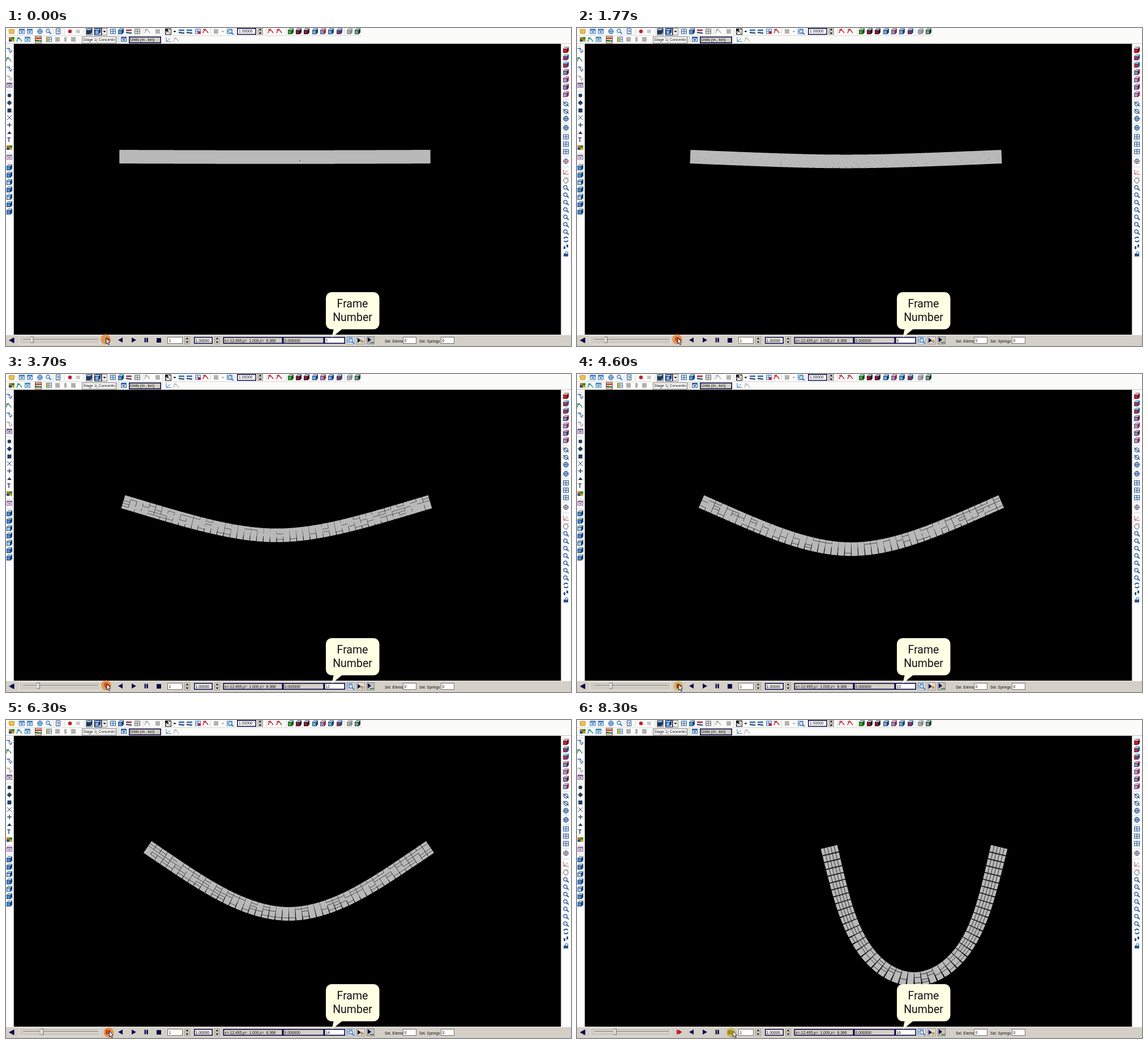
Animation, 998 px wide and 561 px high, one loop 8360 ms. Source, as an HTML page with a canvas:

```html
<!DOCTYPE html>
<html lang="en">
<head>
<meta charset="utf-8">
<title>Beam collapse</title>
<style>
html, body { margin: 0; width: 100%; height: 100%; overflow: hidden; background: #000; }
canvas { display: block; }
</style>
</head>
<body>
<canvas id="stage" width="998" height="561"></canvas>
<script>
const stage = document.getElementById('stage');
const LOOP = 8360, COLS = 48, ROWS = 5;
const NAVY = '#0a0a4a', FACE = '#d4d0c8', BLUE = '#3f78bd', RED = '#c02030', GRAY = '#a9a9a9';
const UI_FONT = '6.8px "Liberation Sans", Arial, sans-serif';
let g = stage.getContext('2d');

// ---------- drawing helpers ----------
function rect(x, y, w, h, c) { g.fillStyle = c; g.fillRect(x, y, w, h); }
function frame(x, y, w, h, fill, edge, lw = 1) {
  rect(x, y, w, h, fill);
  g.strokeStyle = edge; g.lineWidth = lw;
  g.strokeRect(x + lw / 2, y + lw / 2, w - lw, h - lw);
}
function path(pts, fill, stroke, lw = 1, closed = true) {
  g.beginPath();
  pts.forEach(([x, y], i) => i ? g.lineTo(x, y) : g.moveTo(x, y));
  if (closed) g.closePath();
  if (fill) { g.fillStyle = fill; g.fill(); }
  if (stroke) { g.strokeStyle = stroke; g.lineWidth = lw; g.stroke(); }
}
function line(x1, y1, x2, y2, c, lw = 1) { path([[x1, y1], [x2, y2]], null, c, lw, false); }
function disc(x, y, r, fill, stroke, lw = 1) {
  g.beginPath(); g.arc(x, y, r, 0, 7);
  if (fill) { g.fillStyle = fill; g.fill(); }
  if (stroke) { g.strokeStyle = stroke; g.lineWidth = lw; g.stroke(); }
}
function text(s, x, y, font = UI_FONT, c = '#111', align = 'left') {
  g.font = font; g.fillStyle = c; g.textAlign = align; g.fillText(s, x, y);
}
function tri(x, y, dir, c, w = 4) { path([[x - dir * w, y - 4.5], [x - dir * w, y + 4.5], [x + dir * w, y]], c); }

// ---------- toolbar icons ----------
const icons = {
  cube(x, y, c, d = '#16406f') {
    path([[x - 5, y - 2], [x - 2, y - 5], [x + 5, y - 5], [x + 2, y - 2]], '#b9d3ee', d, .7);
    path([[x + 2, y - 2], [x + 5, y - 5], [x + 5, y + 2], [x + 2, y + 5]], d);
    frame(x - 5, y - 2, 7, 7, c, d, .8);
  },
  grid(x, y, c) {
    frame(x - 5, y - 4.5, 10, 9, '#e4edf7', c);
    line(x, y - 4, x, y + 4, c); line(x - 5, y, x + 5, y, c);
  },
  win(x, y, c) { frame(x - 5, y - 4.5, 10, 9, '#dbe8f6', c); rect(x - 5, y - 4, 10, 2.5, c); rect(x - 2, y, 4, 2, c); },
  block(x, y, c) { rect(x - 4, y - 4, 8, 8, c); },
  disc(x, y, c) { disc(x, y, 3.3, c); },
  globe(x, y, c) {
    disc(x, y, 4.5, '#b5d0ef', c);
    line(x - 4, y, x + 4, y, c); g.beginPath(); g.ellipse(x, y, 2, 4.5, 0, 0, 7); g.stroke();
  },
  lens(x, y, c) { disc(x - 1, y - 1, 3.2, '#d9e8f8', c, 1.2); line(x + 1, y + 1, x + 5, y + 4.5, c, 1.8); },
  curve(x, y, c) {
    g.beginPath(); g.moveTo(x - 5, y + 3); g.quadraticCurveTo(x - 2, y - 8, x + 4, y + 3);
    g.strokeStyle = c; g.lineWidth = 1.5; g.stroke(); line(x - 5, y - 3, x, y - 4, c, 1.3);
  },
  arrow(x, y, c) {
    line(x - 5, y - 3, x + 1, y - 3, c, 1.4);
    path([[x - 1, y - 3], [x + 5, y + 2], [x + 2, y + 2], [x + 3, y + 5], [x, y + 3]], '#fff', c);
  },
  caret(x, y, c) { path([[x - 2.5, y - 1], [x + 2.5, y - 1], [x, y + 2]], c); },
  pause(x, y, c) { rect(x - 2.5, y - 3, 2, 6, c); rect(x + .8, y - 3, 2, 6, c); },
  bar(x, y, c) { rect(x - 2, y - 4, 4, 8, c); },
  folder(x, y, c) { path([[x - 5, y - 3], [x, y - 4], [x + 5, y - 3], [x + 4, y + 4], [x - 4, y + 4]], c, '#a67c16', .7); },
  flag(x, y, c) { line(x - 5, y - 2, x + 5, y - 2, c, 3); line(x - 5, y + 2, x + 5, y + 3, '#14365e', 2); },
  diamond(x, y, c) { path([[x, y - 4.5], [x + 4.5, y], [x, y + 4.5], [x - 4.5, y]], c); },
  cross(x, y, c) { line(x - 4, y - 4, x + 4, y + 4, c); line(x - 4, y + 4, x + 4, y - 4, c); },
  plus(x, y, c) { line(x - 4, y, x + 4, y, c, 1.4); line(x, y - 4, x, y + 4, c, 1.4); },
  up(x, y, c) { path([[x - 4, y + 3], [x + 4, y + 3], [x, y - 2]], c); },
  letter(x, y, c) { text('T', x, y + 3.5, 'bold 10px "Liberation Sans", sans-serif', c, 'center'); },
  help(x, y, c) { frame(x - 4, y - 5, 8, 10, '#fff', c); text('?', x, y + 3.5, 'bold 9px "Liberation Sans", sans-serif', c, 'center'); },
  color(x, y) {
    rect(x - 5, y - 4, 5, 4, '#d07018'); rect(x, y - 4, 5, 4, '#2a8a30');
    rect(x - 5, y, 5, 4, '#1b4f98'); rect(x, y, 5, 4, '#c8a818');
  },
  swirl(x, y, c) { disc(x, y, 3.6, null, c, 1.4); line(x - 5, y - 4, x + 5, y + 4, c, 1.4); },
  target(x, y, c) { disc(x, y, 4, '#f2dfe3', c); line(x - 5, y, x + 5, y, RED); line(x, y - 5, x, y + 5, c); },
  axes(x, y, c) { line(x - 4, y - 4, x - 4, y + 4, c); line(x - 4, y + 4, x + 5, y + 4, c); line(x - 4, y + 4, x + 3, y - 2, c); },
  hand(x, y, c) { path([[x - 5, y], [x - 2, y - 4], [x + 3, y - 4], [x + 4, y + 1], [x + 1, y + 5], [x - 2, y + 4]], '#fff', c); },
  cycle(x, y, c) {
    g.strokeStyle = c; g.lineWidth = 2;
    g.beginPath(); g.arc(x, y, 4, .4, 2.5); g.stroke(); g.beginPath(); g.arc(x, y, 4, 3.5, 5.7); g.stroke();
  },
  feet(x, y, c) { rect(x - 4, y - 1, 3, 5, c); rect(x + 1, y - 4, 3, 5, c); },
  lock(x, y, c) { rect(x - 4, y - 1, 8, 5, c); disc(x + 1, y - 2, 2.5, null, c); }
};
function icon(name, c, y, ...xs) { xs.forEach(x => icons[name](x, y, c)); }
function column(name, c, x, ...ys) { ys.forEach(y => icons[name](x, y, c)); }

function spinner(x, y, h) {
  frame(x - 5, y - h / 2, 10, h, FACE, '#8d8a84', .7);
  line(x - 5, y, x + 5, y, '#8d8a84', .7);
  path([[x - 2.5, y - 2], [x + 2.5, y - 2], [x, y - 5]], '#111');
  path([[x - 2.5, y + 2], [x + 2.5, y + 2], [x, y + 5]], '#111');
}

function drawTop() {
  rect(0, 0, 998, 28, '#fbfbfa');
  line(0, 13.5, 628, 13.5, '#d9d7d2'); line(0, 27.5, 998, 27.5, '#c9c7c2');
  icon('folder', '#f0c04c', 6, 10);
  icon('win', BLUE, 6, 28, 42);
  icon('globe', BLUE, 6, 60);
  icon('lens', BLUE, 6, 75);
  icon('help', '#24508f', 6, 92);
  icon('disc', RED, 6, 113);
  icon('pause', GRAY, 6, 127);
  frame(141, 0, 12, 13, '#cfcac2', '#888'); icon('cube', '#22334d', 6, 147);
  frame(156, 0, 13, 13, '#eef4fb', NAVY); icon('cube', '#86b5e6', 6, 162);
  frame(169, 0, 10, 13, '#f2f0ec', '#888');
  icon('caret', '#111', 6, 174, 298); icon('caret', GRAY, 6, 383);
  icon('grid', '#2b5d9c', 6, 189); icon('cube', '#5f9bdb', 6, 203);
  icon('flag', '#a04058', 6, 217);
  icon('grid', '#666', 6, 232);
  icon('curve', GRAY, 6, 250);
  icon('block', '#b5b3af', 6, 268, 371);
  frame(281, 1, 11, 11, '#fff', '#111'); icon('cross', '#333', 6, 286); rect(282, 2, 4, 4, '#222');
  icon('flag', BLUE, 6, 310, 324);
  icon('grid', BLUE, 6, 339); rect(339, 6, 5, 4, RED);
  icon('curve', RED, 6, 353);
  icon('grid', '#4682b4', 6, 395); icon('lens', BLUE, 7, 397);
  frame(408, 0, 34, 12, '#fff', NAVY, 1.5); text('1.00000', 411, 8);
  spinner(449, 6, 12);
  icon('curve', RED, 6, 468, 483);
  icons.cube(503, 6, '#43a037', '#155018');
  [517, 531].forEach(x => icons.cube(x, 6, '#8e1a32', '#251525'));
  icon('cube', '#78a8dd', 6, 546, 574);
  icons.cube(560, 6, '#6ba2dc', '#a02035'); icons.cube(589, 6, '#a52840', '#245084');
  icons.cube(607, 6, '#aaa', '#888'); icons.cube(621, 6, '#7ca18a', '#17372a');
  [21, 83, 103, 138, 182, 242, 277, 361, 403, 460, 495, 598].forEach(x => line(x, 1, x, 12, '#d5d3ce'));

  icon('color', '', 20, 10);
  icon('curve', '#248888', 21, 24); icon('win', '#3d86b5', 20, 38);
  frame(51, 14, 12, 13, '#f4efe2', '#7a5540'); icon('flag', '#c04028', 20, 57); rect(53, 22, 8, 2, '#28803a');
  icon('grid', BLUE, 20, 76); rect(72, 16, 4, 8, '#d4b438');
  icon('block', '#b2b0ac', 20, 91, 119); icon('bar', '#b2b0ac', 20, 105);
  frame(134, 15, 61, 12, '#fff', '#777');
  g.save(); g.beginPath(); g.rect(135, 15, 58, 12); g.clip();
  text('Stage 1( Concentrated', 136, 23); g.restore();
  rect(195, 14, 6, 13, '#e6e3dc');
  icon('win', '#2b5d9c', 20, 208);
  frame(217, 15, 57, 12, FACE, NAVY, 1.6); text('Units (m , ton)', 219.5, 23);
  icon('axes', BLUE, 20, 287); icon('curve', '#bbb', 21, 301);
}

function drawSides() {
  rect(0, 28, 14, 513, '#fdfdfd'); rect(12.5, 28, 1.5, 513, '#d4d2cd');
  rect(980, 28, 18, 513, '#fdfdfd'); rect(980, 28, 1.5, 513, '#d4d2cd');
  [32, 111, 221, 238].forEach(y => line(1, y, 11, y, '#c6c4bf', .8));
  [32, 126, 168, 184, 226, 245, 263].forEach(y => line(983, y, 995, y, '#c6c4bf', .8));
  column('arrow', '#2d5f9e', 6, 39, 72); column('curve', '#3a8668', 5, 56);
  column('arrow', '#999', 6, 88); column('win', '#79577f', 6, 101);
  const k = '#1d3f69';
  column('disc', k, 6, 119); column('diamond', k, 6, 132);
  rect(2.5, 142, 7, 7, k);
  column('cross', k, 6, 158); column('plus', k, 6, 171); column('up', k, 6, 184); column('letter', k, 5, 197);
  column('color', '', 6, 211); column('win', '#9a6d9e', 6, 228);
  column('cube', '#4d8bd0', 6, 246, 259, 285, 311, 324); column('cube', '#a8cdf2', 6, 272, 298);
  icons.cube(989, 39, '#c52324', '#701218');
  [52, 65].forEach(y => icons.cube(989, y, '#c52b35', '#274f84'));
  [78, 104].forEach(y => icons.cube(989, y, '#5d9bdd', '#7a1e35'));
  [91, 117].forEach(y => icons.cube(989, y, '#74aee8', '#a52538'));
  const b = '#28558f';
  column('swirl', b, 989, 134, 147); column('globe', b, 989, 160, 176);
  column('grid', b, 989, 192, 205, 218); column('target', b, 989, 235);
  column('axes', '#b04848', 989, 254); column('hand', '#555', 989, 269);
  column('lens', b, 989, 282, 295, 308, 321, 334, 347, 360);
  column('cycle', b, 989, 373); column('feet', b, 989, 386); column('lock', b, 989, 399);
}

function field(x, w, s, fill = '#fff', edge = '#77746e', lw = 1) {
  frame(x, 545, w, 12, fill, edge, lw); text(s, x + 2.5, 553.5);
}
function drawBottom() {
  rect(0, 541, 998, 20, FACE); rect(0, 541, 998, 1, '#f4f2ee');
  tri(9, 551, -1, NAVY); rect(13, 546.5, 1.6, 9, NAVY);
  frame(23, 543, 143, 15, '#cfcbc3', '#e9e6e0');
  line(31, 549.5, 162, 549.5, '#77746f'); line(31, 550.5, 162, 550.5, '#f1efeb');
  tri(202, 550.5, -1, NAVY); tri(226, 550.5, 1, NAVY);
  rect(266, 547, 8, 8, NAVY);
  field(285, 27, '1'); spinner(320, 551, 13);
  field(332, 33, '1.00000', '#eeece8', NAVY, 1.5); spinner(373, 551, 13);
  field(383.5, 105.5, 'x=-12.495,y=  1.000,z=  8.366', FACE, NAVY, 1.6);
  field(489, 73, '0.000000', FACE, NAVY, 1.6);
  frame(602, 544, 14, 14, '#dfe5ec', '#aaa'); icon('grid', BLUE, 550, 607); icon('lens', BLUE, 552, 610);
  frame(619, 544, 15, 14, '#dedbd4', '#999'); tri(624, 551, 1, NAVY, 3); disc(629, 553, 2.5, '#d09230');
  frame(637, 544, 14, 14, '#c5c1b9', '#888'); tri(642, 550, 1, NAVY, 3); line(643, 555, 650, 555, '#267a32', 1.6);
  text('Sel. Elems', 669, 555); field(701, 24, '0');
  text('Sel. Springs', 730, 555); field(768, 24, '0');
}

function drawBubble() {
  g.beginPath();
  g.roundRect(565, 466, 94.5, 65.5, 10);
  g.fillStyle = '#ffffe4'; g.fill();
  path([[579, 530], [595, 530], [575.5, 546]], '#ffffe4');
  const f = '19.5px Roboto, "Noto Sans", sans-serif';
  text('Frame', 612, 493, f, '#111', 'center');
  text('Number', 612, 516.5, f, '#111', 'center');
}

// ---------- beam ----------
// [start ms, left x, end y, mid x, mid y, end widening, crack depth, crack width, cross gap, row gap, cross share, row share, slider x]
const poses = [
  [0, 200.3, 227, 475, 227.8, 0, 0, 0, 0, 0, 0, 0, 46],
  [510, 200, 227, 475, 230.5, 0, .05, .4, .4, .4, .01, .01, 48.5],
  [1380, 200, 227, 475, 235.4, 0, .14, .5, .5, .5, .02, .01, 51],
  [2270, 199.6, 226.2, 475, 248, 0, .45, .9, .5, .4, .12, .12, 52.5],
  [2950, 202, 225.6, 476, 265, 0, .5, 1, .6, .5, .3, .2, 55],
  [3500, 207, 225.3, 478, 284.6, 0, .5, 1.1, .7, .6, .58, .28, 57],
  [4200, 219.6, 224.9, 484.5, 309, 0, .75, 1.3, .8, .7, .72, .42, 60],
  [5780, 250, 224, 499.5, 342, 1, .8, 1.5, .9, .7, .85, .55, 63.5],
  [6750, 300.2, 223.4, 524, 384, 2.6, .88, 1.9, 1.2, .7, .96, .68, 67],
  [7370, 445.2, 224, 595.5, 457, 6, .95, 2.2, 1.9, .9, 1, .95, 67]
];

function random(seed) {
  return () => {
    seed = (seed + 0x6D2B79F5) | 0;
    let t = Math.imul(seed ^ seed >>> 15, 1 | seed);
    t = t + Math.imul(t ^ t >>> 7, 61 | t) ^ t;
    return ((t ^ t >>> 14) >>> 0) / 4294967296;
  };
}
// Slope share by distance from midspan: straight ends, bend in the middle
const bend = u => 1 - Math.pow(1 - u, 2.85);

function solve(dx, dy) {
  let lo = 0, hi = 1.55, cx = 1;
  for (let k = 0; k < 30; k++) {
    const a = (lo + hi) / 2;
    let sx = 0, sy = 0;
    for (let i = 0; i < 50; i++) {
      const q = a * bend((i + .5) / 50);
      sx += Math.cos(q) / 50; sy += Math.sin(q) / 50;
    }
    if (sy / sx < dy / dx) lo = a; else hi = a;
    cx = sx;
  }
  return { angle: lo, half: dx / cx };
}

function shape(p) {
  const [, lx, ey, mx, my, wide] = p;
  const { angle, half } = solve(mx - lx, my - ey);
  const n = COLS * 4, pts = [];
  let x = lx, y = ey;
  for (let i = 0; i <= n; i++) {
    const v = i / n * 2 - 1, u = Math.abs(v);
    pts.push({ x, y, u, q: -Math.sign(v) * angle * bend(u), d: 24 + wide * u });
    const w = v + 1 / n, m = -Math.sign(w) * angle * bend(Math.abs(w)), step = 2 * half / n;
    x += Math.cos(m) * step; y += Math.sin(m) * step;
  }
  // f runs 0 at the inner face to 1 at the outer face, off shifts along the axis
  return (c, f, off = 0) => {
    const s = pts[Math.round(c * 4)], h = (f - .5) * s.d;
    return [s.x - Math.sin(s.q) * h + Math.cos(s.q) * off, s.y + Math.cos(s.q) * h + Math.sin(s.q) * off];
  };
}

function drawBeam(p, index) {
  const [, , , , , , depth, crack, gapT, gapR, shareT, shareR] = p;
  const at = shape(p), rnd = random(91 + index * 7);
  const top = [], low = [];
  for (let i = 0; i <= COLS * 4; i++) { top.push(at(i / 4, 0)); low.unshift(at(i / 4, 1)); }
  path(top.concat(low), '#b9b9b9');
  if (!index) { rect(518.5, 233, 1, 2, '#333'); return; }
  for (let c = 1; c < COLS; c++) {
    const u = Math.abs(c / COLS * 2 - 1);
    const len = depth * Math.max(0, 1 - u * (index < 5 ? 2.6 : 1.1)) * (index < 4 ? .35 + rnd() * .75 : .8 + rnd() * .3);
    const w = (crack * (1 - u) + gapT * u) / 2;
    if (len > .02) path([at(c, 1, -w), at(c, 1, w), at(c, 1 - len, .2), at(c, 1 - len, -.2)], '#050505');
    for (let r = 0; r < ROWS; r++) {
      const near = index > 7 ? Math.min(1, .4 + u * 2 + r * .15) : 1;
      if (rnd() < shareT * near) {
        const cut = index < 5 ? .45 : 1;
        const a = at(c, r / ROWS), b = at(c, (r + cut) / ROWS);
        line(...a, ...b, '#111', gapT * (.4 + .6 * Math.max(u, r / ROWS)));
      }
    }
  }
  for (let r = 1; r < ROWS; r++) for (let c = 0; c < COLS; c++) {
    const u = Math.abs((c + .5) / COLS * 2 - 1);
    if (rnd() < shareR * Math.min(1.3, .35 + u * 1.2)) {
      const cut = index < 4 ? .25 : 1;
      line(...at(c, r / ROWS), ...at(c + cut, r / ROWS), '#1c1c1c', gapR);
    }
  }
  if (index < 3) for (let k = 0; k < 34; k++) {
    const [x, y] = at(Math.floor(rnd() * COLS * 4) / 4, .2 + rnd() * .7);
    rect(x, y, 1, 1, ['#c05050', '#5868a8', '#666'][k % 3]);
  }
}

// ---------- pointer and controls ----------
const ease = k => { k = Math.max(0, Math.min(1, k)); return k * k * (3 - 2 * k); };

function drawControls(t, index) {
  const next = poses[index + 1] ? poses[index + 1][0] : Infinity;
  const phase = t - (next - 520);
  const pressed = phase >= 0 && phase < 370;
  const busy = phase >= 370;
  const sx = poses[index][12];
  frame(sx - 3, 544.5, 6, 11, '#dedad2', '#77746f');
  line(sx - 2, 545.5, sx - 2, 554.5, '#fff');
  const move = ease((t - 7720) / 520);
  const x = 176 + ease((t - 800) / 700) + 4.5 * ease((t - 4350) / 600) + 91 * move;
  const y = 549 + 2 * ease((t - 4350) / 600);
  const stepColor = busy ? '#a68018' : '#c01018';
  rect(176, 546.5, 1.8, 8, stepColor); tri(182, 550.5, 1, stepColor, 3.6);
  icon('pause', busy ? '#8d8a84' : NAVY, 550.5, 247.5);
  rect(244.6, 546.5, 2.4, 8, busy ? '#8d8a84' : NAVY); rect(248.4, 546.5, 2.4, 8, busy ? '#8d8a84' : NAVY);
  g.globalCompositeOperation = 'multiply';
  disc(x, y + .5, 8.5, pressed ? '#f8c47a' : '#f9df86');
  g.globalCompositeOperation = 'source-over';
  if (move > .9) rect(266, 547, 8, 8, '#a38f1c');
  if (pressed) {
    disc(x, y, 8, null, '#f0953c', 1.4);
    disc(x, y, 5.5, null, 'rgba(240,130,40,.55)', 1.2);
    if (phase < 130 && index > 1) disc(x, y - .5, 3.8, '#e0402c');
  }
  const cx = x + 1 + move * 2, cy = y - 2;
  path([[0, 0], [0, 10], [2.3, 8], [4, 12], [5.7, 11.2], [4, 7.4], [7, 7.2]].map(([a, b]) => [cx + a, cy + b]), '#fff', '#111', .9);
}

// ---------- scene ----------
const layer = document.createElement('canvas');
layer.width = 998; layer.height = 561;
const view = g;
g = layer.getContext('2d');
rect(0, 0, 998, 561, '#000');
drawTop(); drawSides(); drawBottom();
g = view;

function draw(t) {
  let index = 0;
  while (index < poses.length - 1 && t >= poses[index + 1][0]) index++;
  g.drawImage(layer, 0, 0);
  drawBeam(poses[index], index);
  field(562, 37, String(7 + index), '#fff', NAVY, 1.6);
  drawBubble();
  drawControls(t, index);
}

const start = performance.now();
function tick(now) {
  draw(Math.max(0, now - start) % LOOP);
  requestAnimationFrame(tick);
}
draw(0);
requestAnimationFrame(tick);
</script>
</body>
</html>
```
